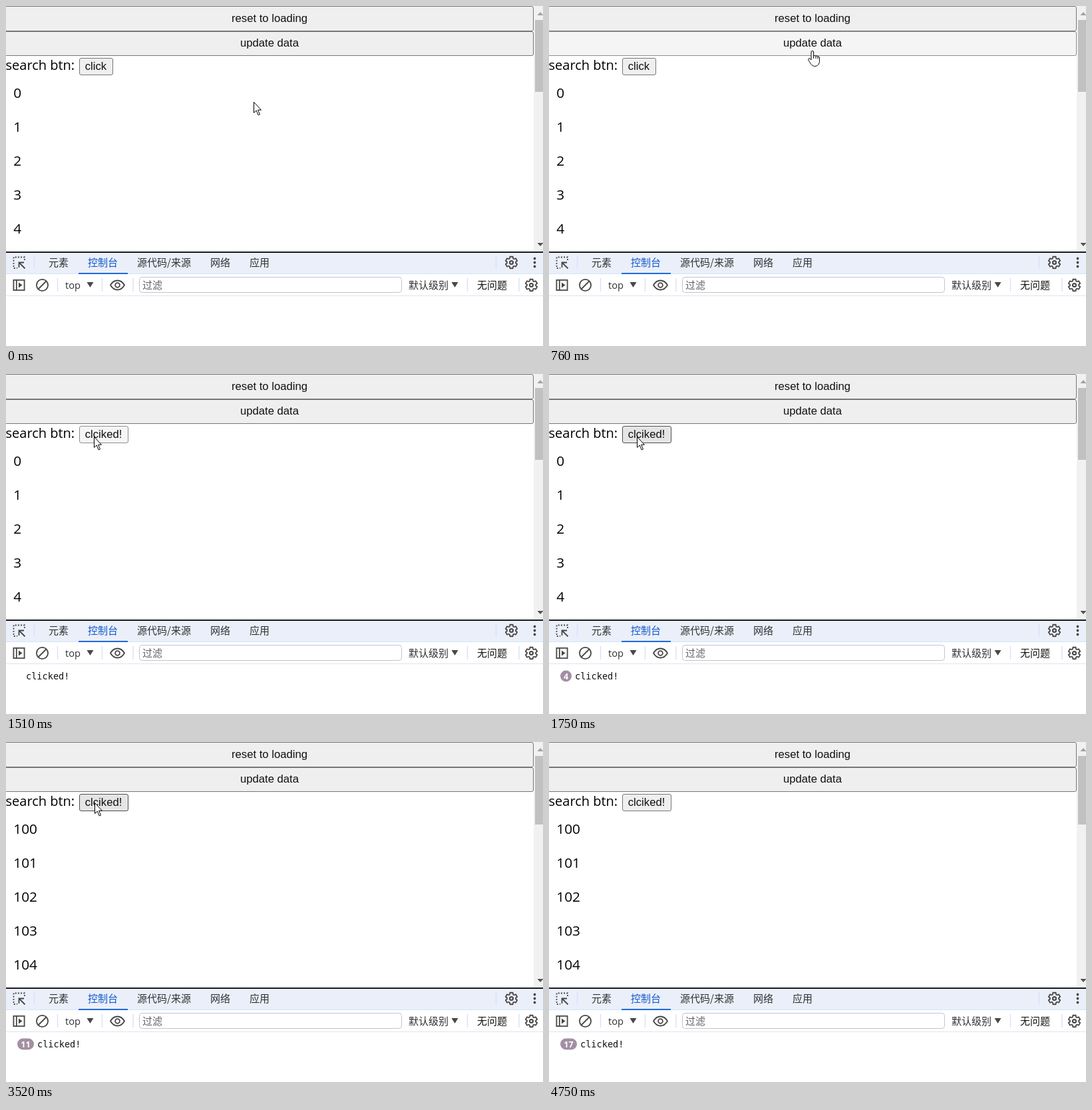
Recreate the animation shown at these times as an HTML page. Size 807x511 px, loop 5240 ms.

```html
<!DOCTYPE html>
<html lang="zh">
<head>
<meta charset="utf-8">
<title>Button clicks</title>
<style>
  html, body { margin: 0; width: 100%; height: 100%; overflow: hidden; background: #fff; }
  svg { display: block; width: 807px; height: 511px; }
  text { white-space: pre; }
  .ui { font: 16.67px "Liberation Sans", Arial, sans-serif; fill: #111; }
  .page { font: 20px "Open Sans", "Noto Sans", sans-serif; }
  .num { font-size: 20.8px; }
  .tool { font: 15px "Noto Sans CJK SC", "Noto Sans CJK", sans-serif; fill: #303134; }
  .latin { font: 14.7px "Open Sans", sans-serif; }
  .mono { font: 13.6px "DejaVu Sans Mono", monospace; fill: #111; }
  .badge { font: bold 12.5px "Open Sans", sans-serif; fill: #fff; text-anchor: middle; }
  .btn { fill: #efefef; stroke: #767676; }
  .btn.hover { fill: #e5e5e5; stroke: #4f4f4f; }
  .btn.down { fill: #f5f5f5; stroke: #8d8d8d; }
  .mid { text-anchor: middle; }
  .icon { fill: none; stroke: #474747; stroke-width: 1.8; }
  .solid { fill: #474747; }
  .sep { stroke: #d3e3fd; stroke-width: 1.4; }
  .cursor { fill: #fff; stroke: #000; stroke-linejoin: round; }
</style>
</head>
<body>
<svg viewBox="0 0 807 511">
  <defs>
    <g id="gear" class="icon">
      <path id="teeth" stroke-linejoin="round"/>
      <circle r="2.5" stroke-width="2.1"/>
    </g>
    <path id="drop" class="solid" d="M-5 -4H5L0 4Z"/>
  </defs>

  <!-- page -->
  <rect class="btn" x="-1.5" y=".5" width="794" height="37" rx="2.5"/>
  <rect class="btn" id="update" x="-1.5" y="38.5" width="794" height="36" rx="2.5"/>
  <text class="ui mid" x="396" y="24">reset to loading</text>
  <text class="ui mid" x="396" y="61">update data</text>
  <text class="page" x="-.5" y="96">search btn:</text>
  <rect class="btn" id="click" x="110.5" y="78.5" width="50" height="25" rx="2.5"/>
  <text class="ui" id="label" x="118.75" y="96">click</text>
  <g class="page" id="list"></g>

  <!-- scrollbar -->
  <rect x="793" width="14" height="369" fill="#f1f1f1"/>
  <rect id="thumb" x="795" y="21" width="12" height="108" fill="#c1c1c1"/>
  <path d="M798.5 14L803 9L807.5 14Z" fill="#a3a3a3"/>
  <path d="M798.5 356L803 361L807.5 356Z" fill="#505050"/>

  <!-- tab bar -->
  <rect y="371" width="807" height="32" fill="#ebeff9"/>
  <rect y="369" width="807" height="2" fill="#1b1b1b"/>
  <rect y="402" width="807" height="1" fill="#d3e3fd"/>
  <rect x="109" y="401" width="74" height="2" fill="#1b6ae0"/>
  <g class="tool">
    <text x="64" y="391">元素</text>
    <text x="123" y="391" style="fill:#0b57d0">控制台</text>
    <text x="197" y="391">源代码/来源</text>
    <text x="307" y="391">网络</text>
    <text x="366" y="391">应用</text>
  </g>
  <path class="icon" stroke-dasharray="2 2.2" d="M28 382V377.5H11.5V394H17"/>
  <path class="icon" d="M28.5 394.5L20.5 386.5M19.5 393V385.5H27"/>
  <path class="sep" d="M42.5 376V395M736.5 376V395"/>
  <use href="#gear" x="759.5" y="385.5"/>
  <path d="M794.5 379.5V392" stroke="#474747" stroke-width="3.8" stroke-linecap="round" stroke-dasharray="0 6"/>

  <!-- console toolbar -->
  <rect y="435" width="807" height="1" fill="#dfe3ec"/>
  <path class="icon" d="M11.4 411.9H27.6V427.1H11.4ZM15.8 412V427"/>
  <path class="solid" d="M19 415.5L24.5 419.5L19 423.5Z"/>
  <circle class="icon" cx="54.5" cy="419.5" r="8.6"/>
  <path class="icon" d="M48.5 413.5L60.5 425.5" transform="matrix(-1 0 0 1 109 0)"/>
  <path class="sep" d="M77.5 409V429M144.5 409V429M191 409V429M693.5 409V429M771 409V429"/>
  <text class="tool latin" x="89" y="425">top</text>
  <use href="#drop" x="126.5" y="419"/>
  <path class="icon" d="M157 419.5Q161 412.5 167.5 412.5T178 419.5Q174 426.5 167.5 426.5T157 419.5Z"/>
  <circle class="icon" cx="167.5" cy="419.5" r="3.4"/>
  <rect x="200.5" y="407.5" width="394" height="23" rx="4" fill="#fff" stroke="#c2c3c7"/>
  <g class="tool">
    <text x="205" y="425" style="fill:#5f6368">过滤</text>
    <text x="605" y="425">默认级别</text>
    <text x="708" y="425" style="fill:#111">无问题</text>
  </g>
  <use href="#drop" x="674.5" y="419"/>
  <use href="#gear" x="789.5" y="419.5"/>

  <!-- log line -->
  <g id="log">
    <g id="badge">
      <rect id="pill" x="17" y="445.5" width="17" height="17" rx="8.5" fill="#a38fa3"/>
      <text class="badge" id="count" y="458.5"></text>
    </g>
    <text class="mono" id="msg" y="459">clicked!</text>
  </g>

  <g id="cursor" class="cursor">
    <path id="arrow" d="M.5 .5V16.5L4.2 13L7.2 20L9.5 19L6.6 12.3H11.5Z"/>
    <path id="hand" d="M-2 14V2Q-2 .5 -.2 .5T1.6 2V8Q3.2 6.8 5 8.2Q6.7 7.3 8 9Q10.5 8.6 10.5 11V15.5C10.5 20 8 23.5 3.5 23.5C-1.5 23.5 -3 19 -6 14.5Q-6.8 12 -5 11.6Q-3.6 11.4 -2 14M1.6 8V12M5 8.5V12M8 9.2V12.5"/>
  </g>
</svg>
<script>
const LOOP = 5240;
const LOADED = 3220;  // the new rows arrive, with the clicks that were waiting
const WAITING = 4;
const LEFT = 4660;    // the pointer is off the button
const GONE = 4750;

const HOME = [372, 144];
const glides = [
  { from: 225, to: 540, x: 396, y: 67 },
  { from: 830, to: 1090, x: 167, y: 107 },
  { from: 1090, to: 1240, x: 132, y: 94 },
  { from: 2879, to: 2880, x: 133, y: 91 },
  { from: 4605, to: 4720, x: 674, y: 483 }
];
// even clicking: the button is down for the first half of each gap
const bursts = [
  { from: 1360, gap: 110, n: 4 },
  { from: 3270, gap: 100, n: 3 },
  { from: 3960, gap: 300, n: 1 },
  { from: 4140, gap: 60, n: 2 },
  { from: 4290, gap: 120, n: 3 }
];

const $ = id => document.getElementById(id);
const set = (id, attrs) => {
  for (const k in attrs) $(id).setAttribute(k, attrs[k]);
};
const show = (id, on) => set(id, { visibility: on ? 'inherit' : 'hidden' });
const clamp = (v, lo, hi) => Math.min(hi, Math.max(lo, v));
const smooth = k => k * k * (3 - 2 * k);
const during = (t, a, b) => t >= a && t < b;

const rows = Array.from({ length: 5 }, (_, i) => {
  const row = document.createElementNS('http://www.w3.org/2000/svg', 'text');
  row.setAttribute('class', 'num');
  row.setAttribute('x', 11.3);
  row.setAttribute('y', 138 + 51 * i);
  $('list').append(row);
  return row;
});

function gearOutline() {
  const pts = [];
  for (let i = 0; i < 24; i++) {
    const side = i % 4;
    const outer = side === 1 || side === 2;
    const r = outer ? 9 : 6.6;
    const spread = (outer ? 14 : 23) * (side < 2 ? -1 : 1);
    const a = (Math.floor(i / 4) * 60 - 90 + spread) * Math.PI / 180;
    pts.push((r * Math.cos(a)).toFixed(2) + ' ' + (r * Math.sin(a)).toFixed(2));
  }
  return 'M' + pts.join('L') + 'Z';
}
set('teeth', { d: gearOutline() });

function pointer(t) {
  let [x, y] = HOME;
  for (const g of glides) {
    const k = smooth(clamp((t - g.from) / (g.to - g.from), 0, 1));
    x += (g.x - x) * k;
    y += (g.y - y) * k;
  }
  return [x, y];
}

const released = (b, t) => clamp(Math.floor((t - b.from) / b.gap + 0.5), 0, b.n);
const pressed = (b, t) =>
  during(t, b.from, b.from + b.gap * b.n) && (t - b.from) % b.gap < b.gap / 2;
const look = (hover, down) => 'btn' + (down ? ' down' : hover ? ' hover' : '');

function render(t) {
  const [x, y] = pointer(t);
  const onUpdate = y < 75;
  const onClick = t < LEFT && x < 161 && y < 104 || during(t, 1240, LEFT);
  const loaded = t >= LOADED;
  const count = bursts.reduce((n, b) => n + released(b, t), loaded ? WAITING : 0);

  set('cursor', { transform: `translate(${Math.round(x)} ${Math.round(y)})` });
  show('cursor', t < GONE);
  show('arrow', !onUpdate);
  show('hand', onUpdate);

  set('update', { class: look(onUpdate, during(t, 760, 820)) });
  set('click', {
    class: look(onClick, bursts.some(b => pressed(b, t))),
    width: count ? 73 : 50
  });
  $('label').textContent = count ? 'clciked!' : 'click';

  rows.forEach((row, i) => { row.textContent = i + (loaded ? 100 : 0); });
  set('thumb', { height: loaded ? 103 : 108 });

  const wide = count > 9 ? 25 : 17;
  show('log', count > 0);
  show('badge', count > 1);
  set('pill', { width: wide });
  set('count', { x: 17 + wide / 2 });
  set('msg', { x: count > 1 ? 22 + wide : 30 });
  $('count').textContent = count;
}

let start;
function tick(now) {
  start ??= now;
  render((now - start) % LOOP);
  requestAnimationFrame(tick);
}
render(0);
requestAnimationFrame(tick);
</script>
</body>
</html>
```
